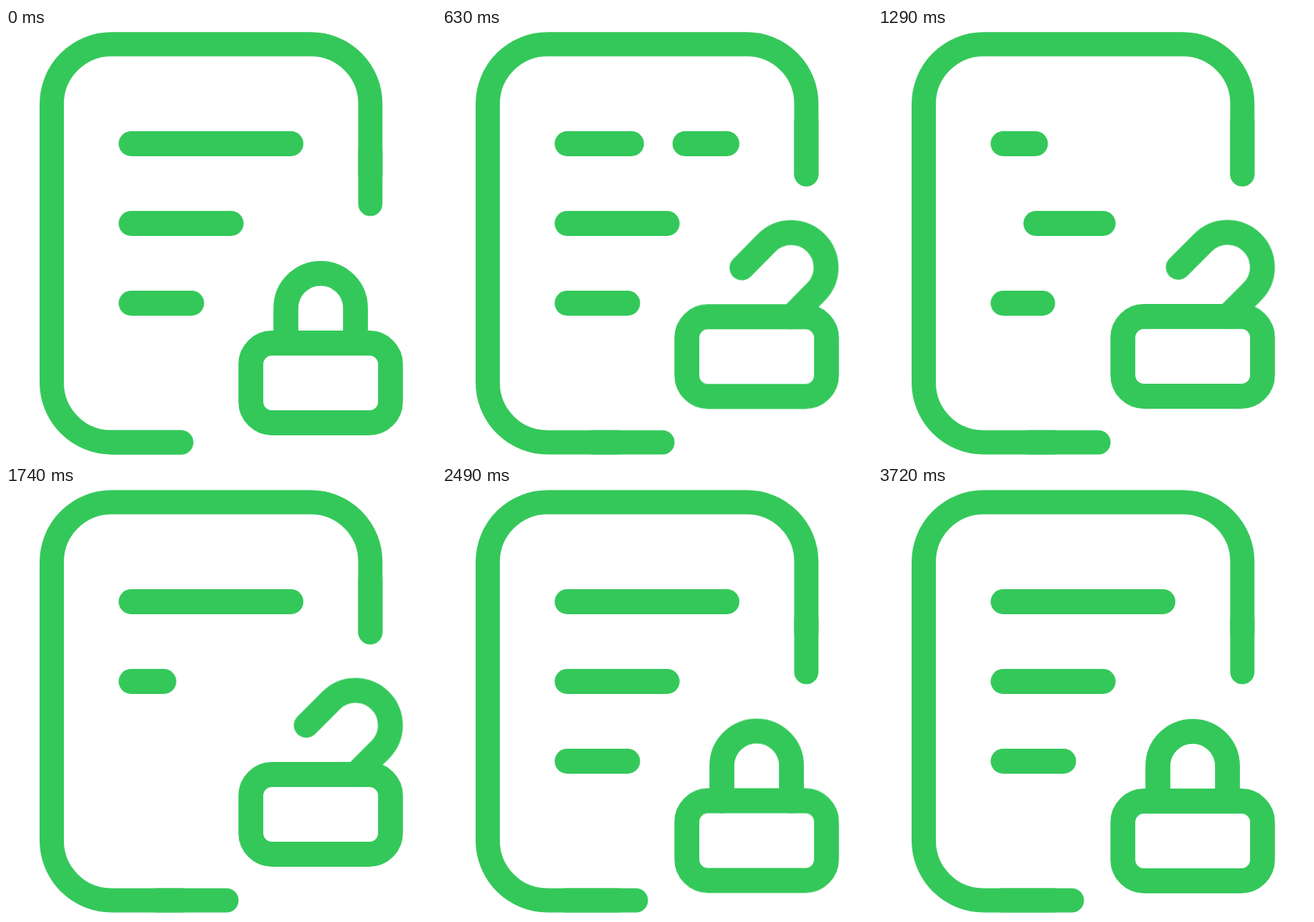
These frames come from a looping animation (550 px wide and 550 px high, 3.75 s). An HTML page:

```html
<!DOCTYPE html>
<html lang="en">
<head>
<meta charset="utf-8">
<title>Locked document</title>
<style>
  html, body { margin: 0; height: 100%; overflow: hidden; background: #fff; }
  svg { display: block; width: 100%; height: 100%; }

  svg * {
    animation: 3750ms linear infinite;
    --ease: cubic-bezier(.333, 0, .667, 1);
    --swing: cubic-bezier(.37, 0, .63, 1);
  }
  .page { stroke-width: 31; }
  .foot { animation-name: foot; }
  .side { animation-name: side; }
  .lock { animation-name: lift; }
  .shackle { animation-name: turn; transform-origin: 447px 403px; }

  /* The three lines share one dash pattern; --s is where each line begins along it. */
  .text { stroke-dasharray: 1300 205 136.7 68.3 700 1; animation-name: write; }

  @keyframes write {
    from { stroke-dashoffset: calc(1846.7px + var(--s)); }
    to { stroke-dashoffset: calc(138.4px + var(--s)); }
  }
  @keyframes foot {
    0% { transform: translateX(0); animation-timing-function: var(--ease); }
    16% { transform: translateX(58px); }
    54.53% { transform: translateX(58px); animation-timing-function: var(--ease); }
    62.53%, 100% { transform: translateX(24px); }
  }
  @keyframes side {
    0% { transform: translateY(38px); animation-timing-function: var(--ease); }
    16% { transform: translateY(0); }
    54.53% { transform: translateY(0); animation-timing-function: var(--ease); }
    62.53%, 100% { transform: translateY(51px); }
  }
  @keyframes turn {
    0%, 2.4% { transform: rotate(0); animation-timing-function: var(--ease); }
    18.8% { transform: rotate(45deg); }
    52% { transform: rotate(45deg); animation-timing-function: var(--ease); }
    60%, 100% { transform: rotate(0); }
  }
  /* Rises once, then drops back with a damped bounce. */
  @keyframes lift {
    0%, 2.4% { transform: translateY(0); animation-timing-function: var(--ease); }
    18.8% { transform: translateY(-34px); }
    55.87% { transform: translateY(-34px); animation-timing-function: cubic-bezier(.25, 0, .6, 1); }
    63.15% { transform: translateY(13px); animation-timing-function: var(--swing); }
    70.43% { transform: translateY(-5px); animation-timing-function: var(--swing); }
    77.71% { transform: translateY(1.9px); animation-timing-function: var(--swing); }
    85.01% { transform: translateY(-.7px); animation-timing-function: var(--swing); }
    92.29% { transform: translateY(.3px); animation-timing-function: var(--swing); }
    100% { transform: translateY(0); }
  }
</style>
</head>
<body>
<svg viewBox="0 0 550 550" fill="none" stroke="#34c85a" stroke-width="31.8" stroke-linecap="round">
  <g class="page">
    <path d="M224 530H135A76.5 76.5 0 0 1 58.5 453.5V97A76.5 76.5 0 0 1 135 20.7H390A76 76 0 0 1 466 97V187"/>
    <path class="foot" d="M135 530H224"/>
    <path class="side" d="M466 120V187"/>
  </g>
  <path class="text" style="--s: 0px" d="M160 148H364.5"/>
  <path class="text" style="--s: 204.5px" d="M160 250H288"/>
  <path class="text" style="--s: 332.5px" d="M160 352H237.5"/>
  <g class="lock">
    <path class="shackle" d="M358 403V358.3A44.5 44.5 0 0 1 447 358.3V403"/>
    <rect x="313.2" y="403" width="178.6" height="102" rx="27"/>
  </g>
</svg>
</body>
</html>
```
